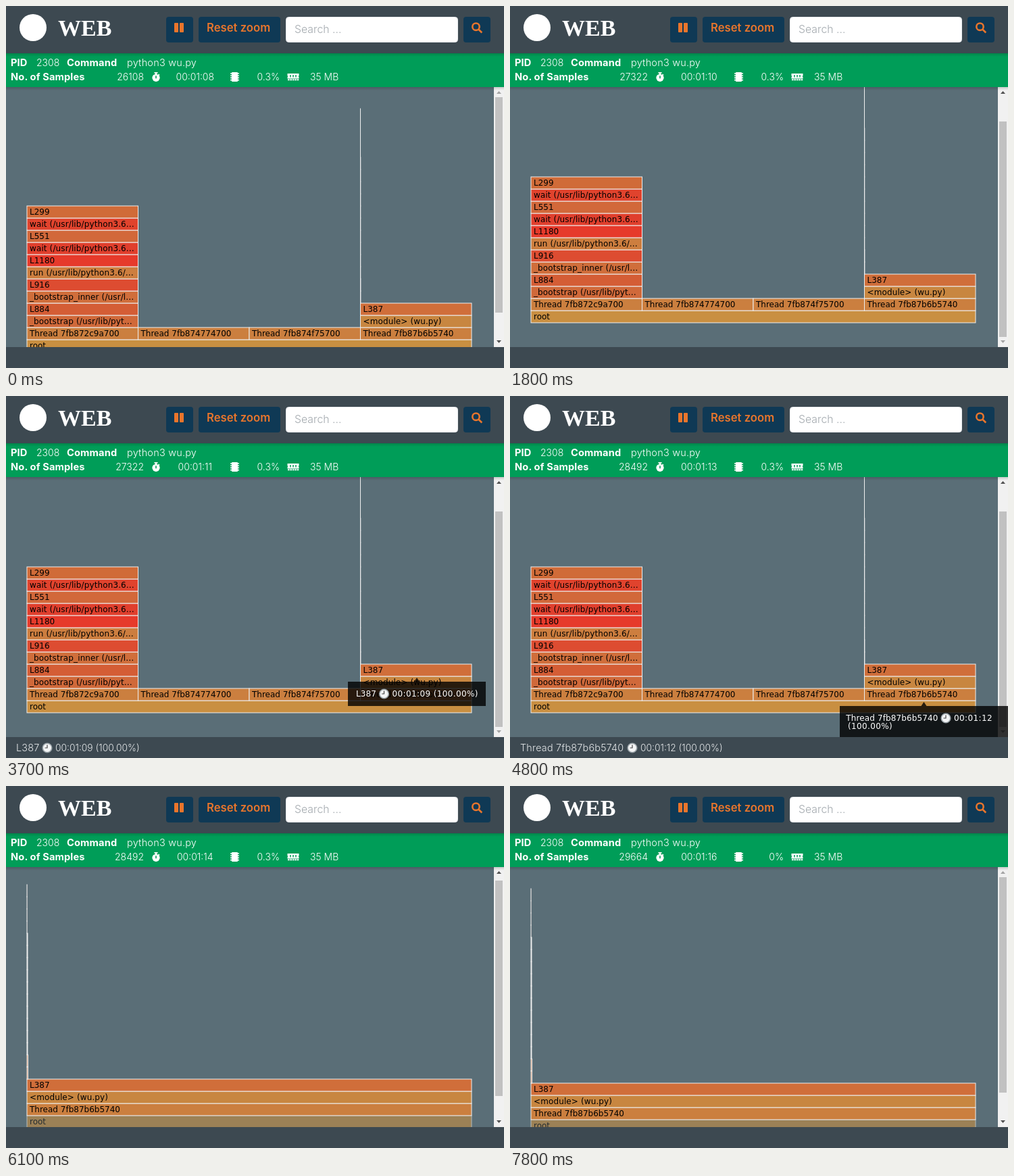
Animation of 737x536 px, one loop 8000 ms. Source, as an HTML page:

```html
<!DOCTYPE html>
<html lang="en">
<head>
<meta charset="utf-8">
<title>Flame graph</title>
<style>
html, body { margin: 0; width: 100%; height: 100%; overflow: hidden; background: #5a6e77; }
svg { display: block; }
text { white-space: pre; }
.ui { font: 300 14px Inter, sans-serif; fill: #fff; }
.ui .b { font-weight: 700; font-size: 14.7px; letter-spacing: .1px; }
.ui .w { font-size: 14.5px; letter-spacing: .2px; }
.mono { font: 12px "DejaVu Sans", sans-serif; }
.path { letter-spacing: .12px; }
.time { letter-spacing: .38px; }
.bar rect { stroke: #eee; stroke-width: 1; }
.end { text-anchor: end; }
.mid { text-anchor: middle; }
</style>
</head>
<body>
<svg id="stage" width="737" height="536" viewBox="0 0 737 536">
  <defs>
    <clipPath id="view"><rect y="120" width="722" height="385"/></clipPath>
    <linearGradient id="shade" x2="0" y2="1">
      <stop stop-color="#000" stop-opacity=".16"/><stop offset="1" stop-color="#000" stop-opacity="0"/>
    </linearGradient>
    <g id="clock">
      <circle r="6.8" fill="#f4f5f6" stroke="#9aa3a8" stroke-width="1.6"/>
      <path d="M0-4.6V0H-3.4" fill="none" stroke="#444" stroke-width="1.2"/>
    </g>
  </defs>
  <rect width="737" height="536" fill="#5a6e77"/>
  <g clip-path="url(#view)"><g id="chart" class="mono"></g></g>

  <rect x="722" y="120" width="15" height="385" fill="#f1f1f1"/>
  <rect id="thumb" x="724" y="135" width="11" height="319" fill="#c1c1c1"/>
  <path id="up" d="M726 130h7l-3.5-4z"/>
  <path id="down" d="M726 495h7l-3.5 4z"/>

  <rect y="70" width="737" height="50" fill="#009d58"/>
  <rect y="120" width="737" height="5" fill="url(#shade)"/>
  <rect width="737" height="70" fill="#3d4951"/>
  <rect y="70" width="737" height="5" fill="url(#shade)"/>

  <circle cx="40" cy="32" r="20" fill="#fff"/>
  <text x="77" y="44" fill="#fff" style="font:bold 34px 'Liberation Serif',serif">WEB</text>

  <g fill="#0f3955">
    <rect x="237" y="16" width="40" height="38" rx="4"/>
    <rect x="285" y="16" width="121" height="38" rx="4"/>
    <rect x="677" y="16" width="40" height="38" rx="4"/>
  </g>
  <rect x="414.5" y="16.5" width="254" height="37" rx="4" fill="#fff" stroke="#e9ecef"/>
  <g fill="#e8752c">
    <rect x="249" y="25" width="6" height="14" rx="1"/>
    <rect x="257" y="25" width="6" height="14" rx="1"/>
    <text x="297" y="38" style="font:600 16.7px Inter,sans-serif">Reset zoom</text>
  </g>
  <g fill="none" stroke="#e8752c" stroke-width="2.6">
    <circle cx="695.5" cy="30.7" r="5.2"/><path d="M699.3 34.5l5 5"/>
  </g>
  <text x="427" y="40" fill="#a3a9ae" style="font:300 15.8px Inter,sans-serif">Search ...</text>

  <g class="ui">
    <text class="b" x="7" y="89">PID</text>
    <text x="45" y="89">2308</text>
    <text class="b" x="90" y="89">Command</text>
    <text class="w" x="179" y="89">python3 wu.py</text>
    <text class="b" x="7" y="110">No. of Samples</text>
    <text class="end" id="samples" x="204" y="110"></text>
    <text class="mid" id="timer" x="279.8" y="110"></text>
    <text class="end" id="cpu" x="405" y="110"></text>
    <text x="450" y="110">35 MB</text>
    <circle cx="222" cy="106.3" r="5.6"/>
    <path d="M219.5 98h5v1.8h-1.5v2h-2v-2h-1.5zM226 100.5l1.6 1.6-1 1-1.6-1.6z"/>
    <path d="M222 103.2v4" stroke="#009d58" stroke-width="1.6"/>
    <rect x="334" y="98" width="9" height="14" rx="1"/>
    <path d="M338.5 99.2v12" stroke="#fff" stroke-width="13" stroke-dasharray="1.6 1.6"/>
    <path d="M416.5 100h17v3.2q-1.6 1 0 2.4v2h-17v-2q1.6-1.4 0-2.4z"/>
    <path d="M417 109.2h16.4" stroke="#fff" stroke-width="2" stroke-dasharray="2.6 .8"/>
    <path d="M421 102v3.4m4 -3.4v3.4m4 -3.4v3.4" stroke="#009d58" stroke-width="1.5"/>
  </g>

  <g id="tip" class="mono" fill="#fff">
    <path id="tipBox" fill="#000" fill-opacity=".8"/>
    <text id="tipName" class="end path"></text>
    <use id="tipClock" href="#clock"/>
    <text id="tipTime" class="time"></text>
    <text id="tipRest" class="time"></text>
  </g>

  <rect y="505" width="737" height="31" fill="#3d4951"/>
  <g id="status" class="ui" style="fill:#e4e7e9">
    <text id="stName" x="15" y="526" style="font-size:14.4px;letter-spacing:.2px"></text>
    <use id="stClock" href="#clock" y="521"/>
    <text id="stTime" y="526" style="font-size:13.8px"></text>
  </g>
</svg>
<script>
const LOOP = 8000, STEP = 100, GROW = 250;
const LEFT = 31, FULL = 658, ROW = 18, ROOT_Y = 494;
const $ = id => document.getElementById(id);
const set = (el, attrs) => { for (const k in attrs) el.setAttribute(k, attrs[k]); return el; };
const make = (tag, parent, attrs = {}) =>
  parent.appendChild(set(document.createElementNS('http://www.w3.org/2000/svg', tag), attrs));

// Bars: column -1 is the root, 0 to 3 are the threads
const bars = [];
const addBar = (col, row, name, color, thin = 0) => {
  const g = make('g', $('chart'), { class: 'bar' });
  const y = ROOT_Y - row * ROW;
  const rect = make('rect', g, { y, height: ROW, fill: color });
  const text = make('text', g, { y: y + 13, class: name.includes('(') ? 'path' : '' });
  text.textContent = name;
  bars.push({ col, g, rect, text, thin });
};
addBar(-1, 0, 'root', '#c98f41');
['872c9a700', '874774700', '874f75700', '87b6b5740'].forEach((id, i) =>
  addBar(i, 1, 'Thread 7fb' + id, '#cb7f3f'));
[
  ['_bootstrap (/usr/lib/pyt…', '#d0693a'],
  ['L884', '#d45d35'],
  ['_bootstrap_inner (/usr/l…', '#d06e3b'],
  ['L916', '#dd4c31'],
  ['run (/usr/lib/python3.6/…', '#cd7e3f'],
  ['L1180', '#e63a2b'],
  ['wait (/usr/lib/python3.6…', '#e03f2d'],
  ['L551', '#d2683a'],
  ['wait (/usr/lib/python3.6…', '#e0432d'],
  ['L299', '#d06b38']
].forEach(([name, color], i) => addBar(0, i + 2, name, color));
addBar(3, 2, '<module> (wu.py)', '#c88640');
addBar(3, 3, 'L387', '#d06e3a');
for (let r = 19; r > 3; r--) addBar(3, r, '', '#d07a45', r < 6 ? 1.6 : r < 16 ? 1 : .1);

// Timelines
const ticks = [800, 1800, 2800, 3900, 4800, 5800, 6900, 7800];
const updates = [994, 3994, 6994];
const ZOOM = 4995;
const samples = [[0, 26108], [900, 27322], [4000, 28492], [7000, 29664]];
const scroll = [[700, 0], [800, 4], [900, 14], [1000, 28], [1100, 38], [1200, 43],
  [5800, 43], [5900, 36], [6000, 20], [6100, 6], [6200, 0]];

const inner = { name: '_bootstrap_inner (/usr/lib/python3.6/threading.py)', width: 486, clock: 374 };
const thread = { name: 'Thread 7fb87b6b5740', width: 249, clock: 181, wrap: true };
const wu = { name: '(wu.py)', width: 222, clock: 78 };
const line = { name: 'L387', width: 204, clock: 61 };
// from, to, item, centre, top, seconds
const tips = [
  [2500, 3200, inner, 113, 405, '09'],
  [3300, 3500, thread, 612.5, 459, '09'],
  [3500, 3700, wu, 608, 441, '09'],
  [3700, 4000, line, 608, 423, '09'],
  [4200, 5000, thread, 612.5, 459, '12'],
  [5500, 6000, wu, 361, 441, '12'],
  [6400, 7400, line, 361, 466, '12']
];

const clamp = v => Math.min(1, Math.max(0, v));
const cubic = v => v < .5 ? 4 * v ** 3 : 1 - 4 * (1 - v) ** 3;
const held = (table, t) => table.filter(k => k[0] <= t).pop()[1];
const tween = (table, t) => {
  const i = table.findIndex(k => k[0] > t);
  if (i === 0) return table[0][1];
  if (i < 0) return table[table.length - 1][1];
  const [a, u] = table[i - 1], [b, v] = table[i];
  return u + (v - u) * (t - a) / (b - a);
};

function drawBars(t) {
  const zoom = cubic(clamp((t - ZOOM) / GROW));
  const zoomed = t >= ZOOM;
  const start = updates.find(s => t >= s && t < s + GROW);
  const grow = start === undefined ? 1 : cubic((t - start) / GROW);
  for (const { col, g, rect, text, thin } of bars) {
    const root = col < 0;
    const hidden = zoomed && !root && col < 3;
    g.style.display = hidden ? 'none' : '';
    if (hidden) continue;
    const x = root ? LEFT : LEFT + col * FULL / 4 * (1 - zoom);
    const share = root ? 1 : (1 + 3 * zoom) / 4;
    set(rect, { x, width: Math.max(.02, (thin || FULL) * share * grow) });
    set(text, { x: x + 4 });
    text.style.display = grow < 1 ? 'none' : '';
    if (root) g.style.opacity = zoomed ? .6 : 1;
  }
}

function drawScroll(t) {
  const y = tween(scroll, t);
  set($('chart'), { transform: `translate(0 ${-y})` });
  set($('thumb'), { y: 135 + Math.round(y * 36 / 43) });
  set($('up'), { fill: y > 0 ? '#505050' : '#a3a3a3' });
  set($('down'), { fill: y < 43 ? '#505050' : '#a3a3a3' });
}

function drawTip(t) {
  const now = tips.find(([from, to]) => t >= from && t < to);
  $('tip').style.display = now ? '' : 'none';
  if (!now) return;
  const [from, , item, cx, top, sec] = now;
  const { name, width, wrap } = item;
  const left = cx - width / 2, right = cx + width / 2;
  const clock = wrap ? left + 157 : right - 150.5;
  const time = '00:01:' + sec;
  $('tip').style.opacity = from === 2500 && t < 2600 ? .5 : 1;
  set($('tipBox'), { d: `M${left} ${top}H${cx - 4}L${cx} ${top - 6}L${cx + 4} ${top}H${right}v${wrap ? 48 : 36}H${left}z` });
  set($('tipName'), { x: clock - 11.5, y: top + 22 }).textContent = name;
  set($('tipClock'), { x: clock, y: top + 18 });
  set($('tipTime'), { x: clock + 12, y: top + 22 }).textContent = wrap ? time : time + ' (100.00%)';
  set($('tipRest'), { x: left + 12, y: top + 34 }).textContent = wrap ? '(100.00%)' : '';
}

function drawStatus(t) {
  // The line stays until the next hover, but clears when the pointer leaves
  const last = tips.filter(k => k[0] <= t).pop();
  const gone = !last || (t >= 6000 && t < 6400) || t >= 7400;
  $('status').style.display = gone ? 'none' : '';
  if (gone) return;
  const { name, clock } = last[2];
  $('stName').textContent = name;
  set($('stClock'), { x: clock });
  set($('stTime'), { x: clock + 12 }).textContent = `00:01:${last[5]} (100.00%)`;
}

function draw(t) {
  drawBars(t);
  drawScroll(t);
  drawTip(t);
  drawStatus(t);
  const sec = 8 + ticks.filter(k => k <= t).length;
  $('timer').textContent = '00:01:' + String(sec).padStart(2, '0');
  $('samples').textContent = held(samples, t);
  $('cpu').textContent = t < 7000 ? '0.3%' : '0%';
}

const begin = performance.now();
function frame() {
  const t = (performance.now() - begin) % LOOP;
  draw(Math.floor(t / STEP) * STEP);
  requestAnimationFrame(frame);
}
frame();
</script>
</body>
</html>
```
